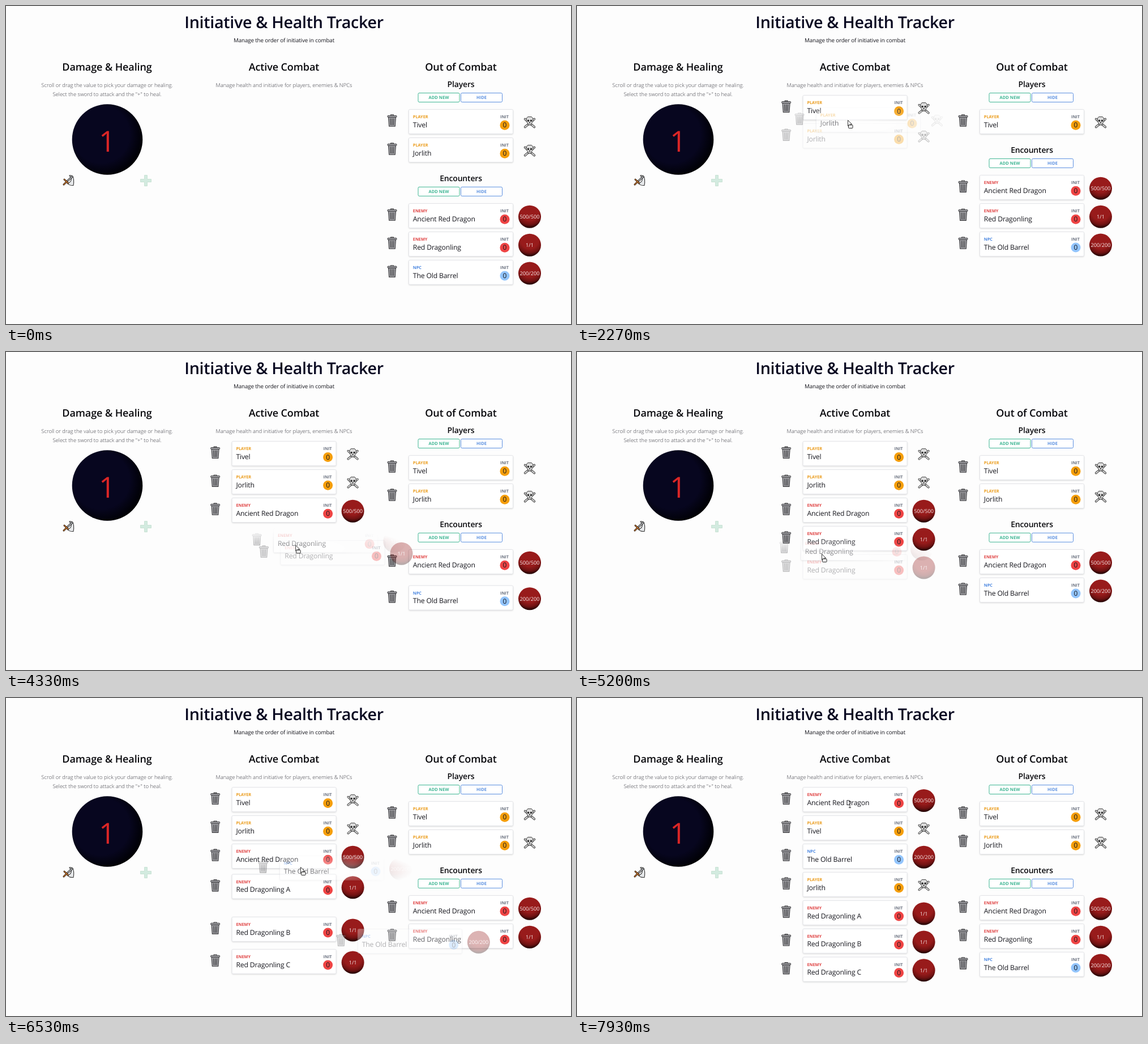
An HTML page that plays this animation: 998x561 px, repeating every 8000 ms.

```html
<!DOCTYPE html>
<html lang="en">
<head>
<meta charset="utf-8">
<title>Initiative &amp; Health Tracker</title>
<style>
  html, body { margin: 0; width: 100%; height: 100%; overflow: hidden; background: #fdfdfd; }
  svg { display: block; width: 998px; height: 561px; }
  text { font-family: "Open Sans", "Noto Sans", sans-serif; fill: #16161d; text-rendering: geometricPrecision; }
  .mid { text-anchor: middle; }
  .title { font-size: 28.7px; font-weight: 600; letter-spacing: -.011em; fill: #080820; }
  .sub { font-size: 9.8px; letter-spacing: -.013em; }
  .h2 { font-size: 18px; font-weight: 600; letter-spacing: -.006em; fill: #08080c; }
  .h3 { font-size: 14px; font-weight: 600; letter-spacing: -.012em; fill: #08080c; }
  .light { font-size: 9.45px; font-weight: 300; fill: #3c3c44; }
  .small { font-size: 7.3px; font-weight: 700; }
  .button { font-size: 7.5px; font-weight: 700; }
  .name { font-size: 12.2px; letter-spacing: -.013em; }
  .init { font-size: 12px; }
  .health { font-size: 9.2px; fill: #f6e9e9; }
  .card { fill: #fff; stroke: #e3e4e8; filter: drop-shadow(0 1px 1px #0002); }
</style>
</head>
<body>
<svg viewBox="0 0 998 561">
  <defs>
    <radialGradient id="dial" cx=".41" cy=".43" r=".61">
      <stop offset=".66" stop-color="#07061f"/><stop offset="1" stop-color="#000003"/>
    </radialGradient>
    <radialGradient id="ball" cx=".5" cy=".26" r=".77">
      <stop offset=".52" stop-color="#981b1b"/><stop offset=".76" stop-color="#701212"/><stop offset="1" stop-color="#0c0000"/>
    </radialGradient>
    <radialGradient id="fade" gradientUnits="userSpaceOnUse" cx="0" cy="0" r="200" gradientTransform="translate(0 6) scale(1 .19)">
      <stop offset="0" stop-color="#fff" stop-opacity=".68"/>
      <stop offset=".35" stop-color="#fff" stop-opacity=".4"/>
      <stop offset=".65" stop-color="#fff" stop-opacity=".17"/>
      <stop offset="1" stop-color="#fff" stop-opacity="0"/>
    </radialGradient>
    <mask id="halo" maskUnits="userSpaceOnUse" x="-320" y="-70" width="640" height="140">
      <rect x="-320" y="-70" width="640" height="140" fill="url(#fade)"/>
    </mask>
    <g id="trash" stroke="#3a3a3d" stroke-linejoin="round">
      <path d="M-6.5-6H6.5L5.3 10H-5.3Z" fill="#a4a4a8" stroke-width="1.1"/>
      <path d="M-3-4L-2.5 8M0-4V8M3-4L2.5 8" fill="none" stroke-width="1.2"/>
      <path d="M-2.5-9V-10.4H2.5V-9" fill="none" stroke-width="1.1"/>
      <rect x="-8" y="-9" width="16" height="3" rx="1" fill="#a4a4a8" stroke-width="1"/>
    </g>
    <g id="skull">
      <g fill="none" stroke-linecap="round">
        <path d="M-8.3-5.5L8.3 8.5M8.3-5.5L-8.3 8.5" stroke="#333" stroke-width="3.6"/>
        <path d="M-8.3-5.5L8.3 8.5M8.3-5.5L-8.3 8.5" stroke="#ddd" stroke-width="1.9"/>
      </g>
      <g transform="translate(0 -1) scale(.85)" fill="#2a2a2a">
        <path d="M-4-10H4Q7.5-8 7-2Q6.5 2 3.8 3V7H-3.8V3Q-6.5 2-7-2Q-7.5-8-4-10Z" fill="#dedede" stroke="#333" stroke-width="1.1"/>
        <ellipse cx="-3" cy="-2" rx="2" ry="2.2"/>
        <ellipse cx="3" cy="-2" rx="2" ry="2.2"/>
        <path d="M0 .5L1.2 3H-1.2ZM-1.5 4.5V7M1.5 4.5V7" stroke="#2a2a2a" stroke-width=".7"/>
      </g>
    </g>
  </defs>

  <rect width="998" height="561" fill="#fdfdfd"/>
  <text class="mid title" x="491" y="39">Initiative &amp; Health Tracker</text>
  <text class="mid sub" x="491" y="63.5">Manage the order of initiative in combat</text>
  <text class="mid h2" x="178.5" y="114">Damage &amp; Healing</text>
  <text class="mid h2" x="491" y="114">Active Combat</text>
  <text class="mid h2" x="803.5" y="114">Out of Combat</text>
  <text class="mid light" x="178.5" y="143">Scroll or drag the value to pick your damage or healing.</text>
  <text class="mid light" x="178.5" y="159">Select the sword to attack and the "+" to heal.</text>
  <text class="mid light" x="491" y="143">Manage health and initiative for players, enemies &amp; NPCs</text>

  <circle cx="179" cy="235.5" r="62.3" fill="url(#dial)"/>
  <text class="mid" x="178.5" y="257" style="font-size:51px;fill:#dc2626">1</text>
  <g stroke-linecap="round" fill="none">
    <path d="M112 299Q119 298 119.5 306Q120 312 119 316.5Q112 317 108.5 313Q115 311 115.5 305Z" fill="#e6e8ea" stroke="#333" stroke-width="1.1"/>
    <path d="M107 310L117 301" stroke="#222" stroke-width="3.2"/>
    <path d="M107 310L117 301" stroke="#c9ccd0" stroke-width="1.5"/>
    <path d="M102 315L107.5 309.5M103 306L109.5 312.5" stroke="#2b1a10" stroke-width="3"/>
    <path d="M102 315L107.5 309.5M103 306L109.5 312.5" stroke="#c8762c" stroke-width="1.2"/>
  </g>
  <path d="M244.5 298.5h5v7h7v5h-7v7h-5v-7h-7v-5h7z" fill="#d3ebe0" stroke="#c2decf" stroke-width=".8"/>

  <g id="players"></g>
  <g id="encounters"></g>
  <g id="list"></g>
  <g id="active"></g>
  <g id="drag" mask="url(#halo)"><g id="dragRows"></g></g>
  <g id="cursor">
    <g id="arrow" fill="#fff" stroke="#222">
      <path d="M.5.5V10.5L2.9 8.3L4.6 12L6.2 11.2L4.6 7.7H7.7Z" stroke-width=".9"/>
      <rect id="dragBox" x="1.5" y="9" width="7.5" height="5.5" rx=".8"/>
    </g>
    <path id="beam" d="M-2-5.5H2M0-5.5V5.5M-2 5.5H2" fill="none" stroke="#333"/>
  </g>
</svg>
<script>
const $ = id => document.getElementById(id);
const LOOP = 8, SLIDE = 0.2, PITCH = 49.9, GHOST = 0.33;
const LIST_X = 711, ACTIVE_X = 398.6, ACTIVE_Y = 157.2;
const listY = [182, 232, 348, 398, 447.8];

const roles = {
  PLAYER: { text: '#eb9c1c', dot: '#f59e0b' },
  ENEMY: { text: '#e04444', dot: '#ef4444' },
  NPC: { text: '#4a86e0', dot: '#93c5fd' }
};
const units = [
  { role: 'PLAYER', name: 'Tivel' },
  { role: 'PLAYER', name: 'Jorlith' },
  { role: 'ENEMY', name: 'Ancient Red Dragon', health: '500/500' },
  { role: 'ENEMY', name: 'Red Dragonling', health: '1/1' },
  { role: 'NPC', name: 'The Old Barrel', health: '200/200' }
];

// Each drag of a unit; the last one reorders a card inside the active column.
const drags = [
  { unit: 0, grab: 0.85, enter: 1.1, drop: 1.6 },
  { unit: 1, grab: 1.86, enter: 2.04, drop: 2.66 },
  { unit: 2, grab: 3.0, enter: 3.2, drop: 3.7 },
  { unit: 3, grab: 4.02, enter: 4.2, drop: 4.58 },
  { unit: 3, grab: 4.82, enter: 4.98, drop: 5.36 },
  { unit: 3, grab: 5.6, enter: 5.76, drop: 6.04 },
  { unit: 4, grab: 6.26, enter: 6.46, drop: 6.88 },
  { unit: 2, grab: 7.2, drop: 7.89, card: 2 }
];

// Active cards: the drag that brings each one in, then [time, slot] moves.
const cards = [
  { drag: 0, moves: [[0, 0], [7.62, 1]] },
  { drag: 1, moves: [[0, 1], [6.7, 2], [7.4, 3]] },
  { drag: 2, moves: [[0, 2], [6.6, 3], [7.4, 2], [7.52, 1], [7.62, 0]] },
  { drag: 3, moves: [[0, 3], [6.498, 4]], suffix: ' A', named: 5.36 },
  { drag: 4, moves: [[0, 4], [6.42, 5]], suffix: ' B', named: 5.36 },
  { drag: 5, moves: [[0, 5], [6.4, 6]], suffix: ' C', named: 6.04 },
  { drag: 6, moves: [[0, 3], [6.6, 2], [6.7, 1], [7.52, 2]] }
];

const path = [
  [0.07, 700, 50], [0.75, 787, 215], [0.87, 787, 215], [1.33, 490, 162], [1.6, 488, 172],
  [1.84, 767, 254], [1.88, 767, 254], [2.27, 478, 201], [2.66, 475, 212],
  [2.96, 799, 379], [3.02, 799, 379], [3.47, 473, 249], [3.7, 470, 262],
  [3.98, 750, 428], [4.04, 750, 428], [4.45, 450, 318],
  [4.58, 448, 325], [4.8, 748, 430], [4.84, 748, 430], [5.2, 432, 356], [5.36, 432, 366],
  [5.56, 748, 430], [5.62, 748, 430], [5.95, 436, 400], [6.04, 436, 406],
  [6.22, 748, 468], [6.27, 748, 468], [6.53, 520, 298], [6.75, 484, 232], [6.88, 482, 228],
  [7.12, 482, 341], [7.22, 482, 341], [7.75, 482, 188], [8, 482, 188]
];

const clamp = x => Math.min(1, Math.max(0, x));
const ease = x => (x = clamp(x), x * x * (3 - 2 * x));
const mix = (a, b, p) => a + (b - a) * p;
const place = (el, x, y) => el.setAttribute('transform', `translate(${x} ${y})`);
const show = (el, on, opacity = 1) => {
  el.style.display = on ? '' : 'none';
  el.style.opacity = opacity;
};

function row({ role, name, health }) {
  const { text, dot } = roles[role];
  const badge = health
    ? `<circle cx="214" cy="23.7" r="20" fill="url(#ball)"/><text class="mid health" x="214" y="27">${health}</text>`
    : '<use href="#skull" x="214" y="23"/>';
  return `<g><use href="#trash" x="-29" y="20.3"/>
    <rect class="card" x=".5" y=".5" width="184" height="43" rx="2"/>
    <text class="small" x="7.8" y="16" style="fill:${text}">${role}</text>
    <text class="name" x="7.8" y="31.8">${name}</text>
    <text class="mid small" x="169.5" y="16" style="fill:#6b7280">INIT</text>
    <circle cx="170" cy="28.2" r="8.5" fill="${dot}"/>
    <text class="mid init" x="170" y="32.4">0</text>${badge}</g>`;
}

function section(title, y) {
  const button = (x, label, color) =>
    `<rect x="${x}" y="${y + 10.5}" width="73" height="16" rx="2" fill="#fff" stroke="${color}"/>
     <text class="mid button" x="${x + 36.5}" y="${y + 21.3}" style="fill:${color}">${label}</text>`;
  return `<text class="mid h3" x="803.5" y="${y}">${title}</text>` +
    button(728, 'ADD NEW', '#3cb592') + button(803.5, 'HIDE', '#5a8fe0');
}

$('players').innerHTML = section('Players', 143);
$('encounters').innerHTML = section('Encounters', 308.8);
$('list').innerHTML = $('dragRows').innerHTML = units.map(row).join('');
$('active').innerHTML = cards.map(c => row(units[drags[c.drag].unit])).join('');
const listRows = [...$('list').children];
const dragRows = [...$('dragRows').children];
const activeRows = [...$('active').children];

function cursorAt(t) {
  const i = path.findIndex(p => p[0] > t);
  if (i < 1) return path[i < 0 ? path.length - 1 : 0].slice(1);
  const [a, b] = [path[i - 1], path[i]];
  const p = ease((t - a[0]) / (b[0] - a[0]));
  return [mix(a[1], b[1], p), mix(a[2], b[2], p)];
}

function cardAt({ drag, moves }, t) {
  const { unit, enter } = drags[drag];
  const slot = moves.reduce((s, [at, to], i) => i ? mix(s, to, ease((t - at) / SLIDE)) : to, 0);
  const p = ease((t - enter) / SLIDE);
  return [mix(LIST_X, ACTIVE_X, p), mix(listY[unit], ACTIVE_Y + slot * PITCH, p)];
}

function drawList(t, drag) {
  const taken = drag && t >= drag.enter ? drag.unit : -1;
  listRows.forEach((el, i) => {
    let lift = 0;
    if (taken >= 0 && i > taken) {
      const sameGroup = (i < 2) === (taken < 2);
      lift = sameGroup ? ease((t - drag.enter) / SLIDE) : 1;
    }
    const held = drag && drag.enter && drag.unit === i;
    place(el, LIST_X, listY[i] - lift * PITCH);
    show(el, i !== taken, held ? GHOST : 1);
  });
  place($('encounters'), 0, taken >= 0 && taken < 2 ? -PITCH : 0);
}

function drawActive(t, drag) {
  cards.forEach((card, i) => {
    const el = activeRows[i], source = drags[card.drag];
    const held = t < source.drop || (drag && drag.card === i);
    place(el, ...cardAt(card, t));
    show(el, t >= source.enter, held ? GHOST : 1);
    if (card.suffix) {
      el.querySelector('.name').textContent = units[source.unit].name + (t >= card.named ? card.suffix : '');
    }
  });
}

function drawCursor(t, drag) {
  const [x, y] = cursorAt(t);
  place($('cursor'), x, y);
  show($('cursor'), t >= path[0][0]);
  const typing = t >= drags[drags.length - 1].drop;
  show($('beam'), typing);
  show($('arrow'), !typing);
  show($('dragBox'), !!drag);
  show($('drag'), !!drag);
  if (!drag) return;
  const [gx, gy] = cursorAt(drag.grab);
  const [sx, sy] = drag.enter ? [LIST_X, listY[drag.unit]] : cardAt(cards[drag.card], drag.grab);
  place($('drag'), x, y);
  place($('dragRows'), sx - gx, sy - gy);
  dragRows.forEach((el, i) => show(el, i === drag.unit));
}

function frame() {
  const t = performance.now() / 1000 % LOOP;
  const drag = drags.find(d => t >= d.grab && t < d.drop);
  drawList(t, drag);
  drawActive(t, drag);
  drawCursor(t, drag);
  requestAnimationFrame(frame);
}
frame();
</script>
</body>
</html>
```
